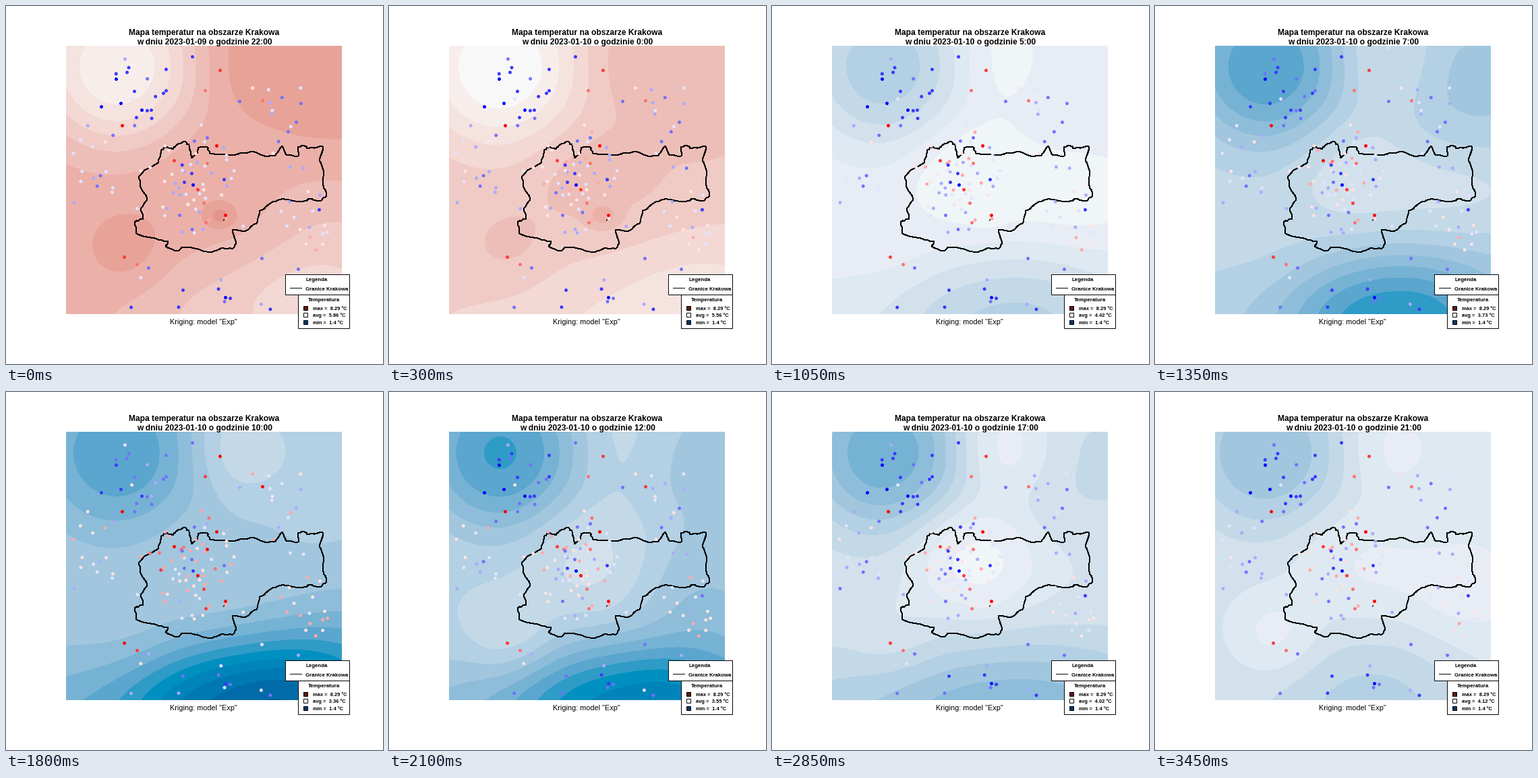
A matplotlib script for the animation above (3600 ms loop, 559x531 px).

```python
import numpy as np
import matplotlib.pyplot as plt
from matplotlib.animation import FuncAnimation
from matplotlib.colors import to_rgb
from matplotlib.patches import Rectangle

W, H, DPI = 559, 531, 64
PX = 72 / DPI                      # one pixel in points
LINE = .97 * PX
X0, X1, Y0, Y1 = 89, 498, 59, 457  # map area
FRAMES, STEP = 24, 150

plt.rcParams["font.family"] = "Liberation Sans"
rng = np.random.default_rng(4)

# Key hours since the start, with the mean temperature and the base colour step.
HOURS = [0, 5, 9, 12, 16, 19, 23]
MEANS = [5.86, 5.10, 3.73, 3.36, 3.75, 4.02, 4.12]
BASE = [6, 1.1, -5.1, -6.9, -4.2, -4, -3.7]

# Warm and cold areas: x, y, radii, then the strength at each key hour.
AREAS = [
    (165, 90, 115, 115, [-5.3, -3, -5.2, -3.3, -6.8, -5.2, -3.7]),  # north-west
    (345, 80, 70, 75, [.8, .8, 1.2, 1.9, -.6, 2, 1.3]),             # north
    (480, 110, 120, 110, [1.1, .8, -1.7, .9, -3.6, -.6, .6]),       # north-east
    (300, 250, 95, 85, [.3, 1.7, 1.2, .3, 2.4, 2.8, 1.2]),          # city
    (318, 312, 25, 20, [1.7, .9, 0, 0, .2, .3, 0]),                 # riverside
    (178, 360, 62, 62, [1, .3, .1, .2, 2.4, .6, 1.5]),              # south-west
    (460, 280, 100, 75, [-.4, 1.4, 1, .3, -2.8, .5, 1.5]),          # east
    (290, 500, 420, 110, [-.3, -1.3, -1.2, -3, -3, -2.7, -.5]),     # southern band
    (345, 470, 150, 105, [-1.6, 0, -5, -5, -3.8, -1.7, -1.9]),      # south
    (500, 420, 130, 120, [-2.2, 0, -1, -2.8, -1.7, -.6, .8])]       # south-east

# Colour steps of 0.2 degrees; LOWEST is the step of the first colour.
LOWEST = -16
PALETTE = """005E9C 006BA8 0079B2 0084BA 0090C0 2F9BC7 5AA6CE 76B2D4 8DBDD9
A1C6DE B3D0E4 C3D9E7 D2E1EC DEE9F1 E8EDF5 F0F5F8 F8F8F8 F7EEEC F5E3E0 F3D8D4
F0CBC6 EDBEB7 EBB1A9 E8A399 E4948A DF857A""".split()
RGB = np.array([to_rgb("#" + c) for c in PALETTE])

# Blue, white and red in ten classes for the stations.
ramp = np.linspace(0, 2, 10)
DOTS = np.column_stack([np.minimum(ramp, 1), 1 - abs(ramp - 1), np.minimum(2 - ramp, 1)])

# Stations that are clearly colder or warmer than the rest: x, y, class.
MARKED = [
    (163, 108, 0), (141, 149, 0), (170, 144, 0), (201, 154, 0), (193, 165, 1), (179, 98, 1),
    (233, 129, 1), (215, 154, 1), (172, 177, 9), (317, 95, 8), (295, 125, 7), (380, 140, 7),
    (346, 141, 2), (430, 172, 2), (312, 207, 9), (249, 229, 8), (275, 248, 1), (264, 261, 1),
    (277, 265, 0), (284, 272, 8), (323, 257, 1), (298, 195, 2), (257, 310, 2), (325, 310, 9),
    (296, 321, 7), (293, 292, 7), (298, 233, 7), (175, 372, 8), (194, 383, 7), (211, 388, 2),
    (379, 374, 2), (433, 390, 2), (262, 421, 1), (325, 432, 0)]

# Groups of ordinary stations: centre, spread, count, mean class.
GROUPS = [
    (215, 120, 40, 28, 12, 2), (135, 220, 25, 38, 16, 3.6), (400, 145, 35, 40, 13, 3.6),
    (285, 225, 30, 22, 26, 4.6), (275, 290, 33, 26, 32, 3.8), (450, 320, 24, 25, 18, 4.1),
    (290, 425, 70, 15, 9, 2.5)]

# Corners of the city limits; small bends are added by roughen().
BORDER = [
    (197, 252), (205, 243), (225, 232), (230, 213), (238, 208), (247, 212), (252, 206),
    (264, 200), (271, 206), (275, 225), (284, 217), (284, 210), (297, 208), (302, 218),
    (333, 221), (364, 215), (383, 222), (399, 221), (409, 207), (416, 221), (433, 222),
    (433, 208), (440, 206), (446, 211), (470, 208), (464, 228), (471, 248), (470, 266),
    (475, 280), (464, 289), (452, 285), (440, 290), (412, 286), (395, 290), (376, 303),
    (371, 322), (355, 333), (335, 331), (341, 352), (335, 360), (320, 358), (305, 365),
    (262, 357), (255, 363), (236, 356), (240, 348), (228, 347), (193, 337), (190, 320),
    (203, 315), (199, 300), (209, 287), (199, 268), (197, 252)]


def bump(x, y, rx, ry):
    """Smooth hill of height one over the map pixels."""
    gx, gy = np.meshgrid(np.arange(X0, X1) + .5, np.arange(Y0, Y1) + .5)
    return np.exp(-np.hypot((gx - x) / rx, (gy - y) / ry) ** 2.5)


def roughen(points, parts=4):
    """Split every segment and shake the new points a little."""
    pts = np.array(points, float)
    k = np.linspace(0, len(pts) - 1, (len(pts) - 1) * parts + 1)
    out = np.column_stack([np.interp(k, range(len(pts)), c) for c in pts.T])
    shake = rng.uniform(-1.2, 1.2, out.shape)
    shake[::parts] = 0
    return out + shake


def scatter_group(x, y, sx, sy, count, mean):
    return np.column_stack([np.clip(rng.normal(x, sx, count), X0, X1 - 1),
                            np.clip(rng.normal(y, sy, count), Y0, Y1 - 1),
                            np.clip(rng.normal(mean, 1.2, count), 1, 6)])


bumps = [bump(*area[:4]) for area in AREAS]
border = roughen(BORDER)
# Marked stations come last so that they lie on top.
stations = np.vstack([scatter_group(*g) for g in GROUPS] + [np.array(MARKED, float)])
phase = rng.uniform(0, 2 * np.pi, len(stations))


def at(hour, values):
    return np.interp(hour, HOURS, values)


def field_image(hour):
    level = at(hour, BASE) + sum(at(hour, a[4]) * b for a, b in zip(AREAS, bumps))
    step = np.rint(level).astype(int) - LOWEST
    return RGB[np.clip(step, 0, len(RGB) - 1)]


def dot_colors(hour):
    morning = 1.2 * np.exp(-((hour - 12) / 2) ** 2)
    level = stations[:, 2] + morning + .4 * np.sin(hour * .9 + phase)
    return DOTS[np.clip(np.rint(level).astype(int), 0, 9)]


fig = plt.figure(figsize=(W / DPI, H / DPI), dpi=DPI, facecolor="white")
ax = fig.add_axes([0, 0, 1, 1])
ax.axis("off")


def label(x, y, text, size, weight="bold", ha="center"):
    return ax.text(x, y, text, fontsize=size * PX, weight=weight, ha=ha,
                   va="baseline", zorder=6)


def box(x, y, w, h, color="white", z=5):
    # The offsets keep snapping on the intended pixel row and column.
    ax.add_patch(Rectangle((x + .1, y + .9), w, h, fc=color, ec="black", lw=LINE, zorder=z))


image = ax.imshow(field_image(0), extent=(X0, X1, Y1, Y0), aspect="auto",
                  interpolation="nearest", zorder=1)
ax.plot(*(border.T + .5), color="black", lw=LINE, antialiased=False, zorder=2)
ax.plot([322.5, 324.5], [318, 316], color="black", lw=1.3 * PX, zorder=2)
dots = ax.scatter(stations[:, 0] + .5, stations[:, 1] + .5, s=(5 * PX) ** 2,
                  c=dot_colors(0), linewidths=0, zorder=3)

label(293.3, 43, "Mapa temperatur na obszarze Krakowa", 12)
date = label(294.3, 57, "", 12)
label(292.5, 472, 'Kriging: model "Exp"', 10.9, "normal")

box(414, 397, 95, 30)
label(461, 408, "Legenda", 7.9)
ax.plot([421.1, 438.1], [417.9, 417.9], color="black", lw=LINE, zorder=6)
label(444, 422, "Granice Krakowa", 7.8, ha="left")

box(433, 427, 76, 50)
label(471, 438, "Temperatura", 7.9)
rows = []
for y, color in [(444, "#5F1A10"), (454, "white"), (465, "#00366C")]:
    box(441, y, 6, 6, color, 6)
    rows.append(label(455, y + 7, "", 7.5, ha="left"))
rows[0].set_text("max =  8.29 ºC")
rows[2].set_text("min =  1.4 ºC")

ax.set_xlim(0, W)
ax.set_ylim(H, 0)


def update(hour):
    image.set_data(field_image(hour))
    dots.set_facecolors(dot_colors(hour))
    day, clock = divmod(22 + hour, 24)
    date.set_text(f"w dniu 2023-01-{9 + day:02d} o godzinie {clock}:00")
    rows[1].set_text(f"avg =  {round(float(at(hour, MEANS)), 2):g} ºC")
    return image, dots, date, rows[1]


anim = FuncAnimation(fig, update, frames=FRAMES, interval=STEP, repeat=True,
                     repeat_delay=0, blit=False)
plt.show()
```
